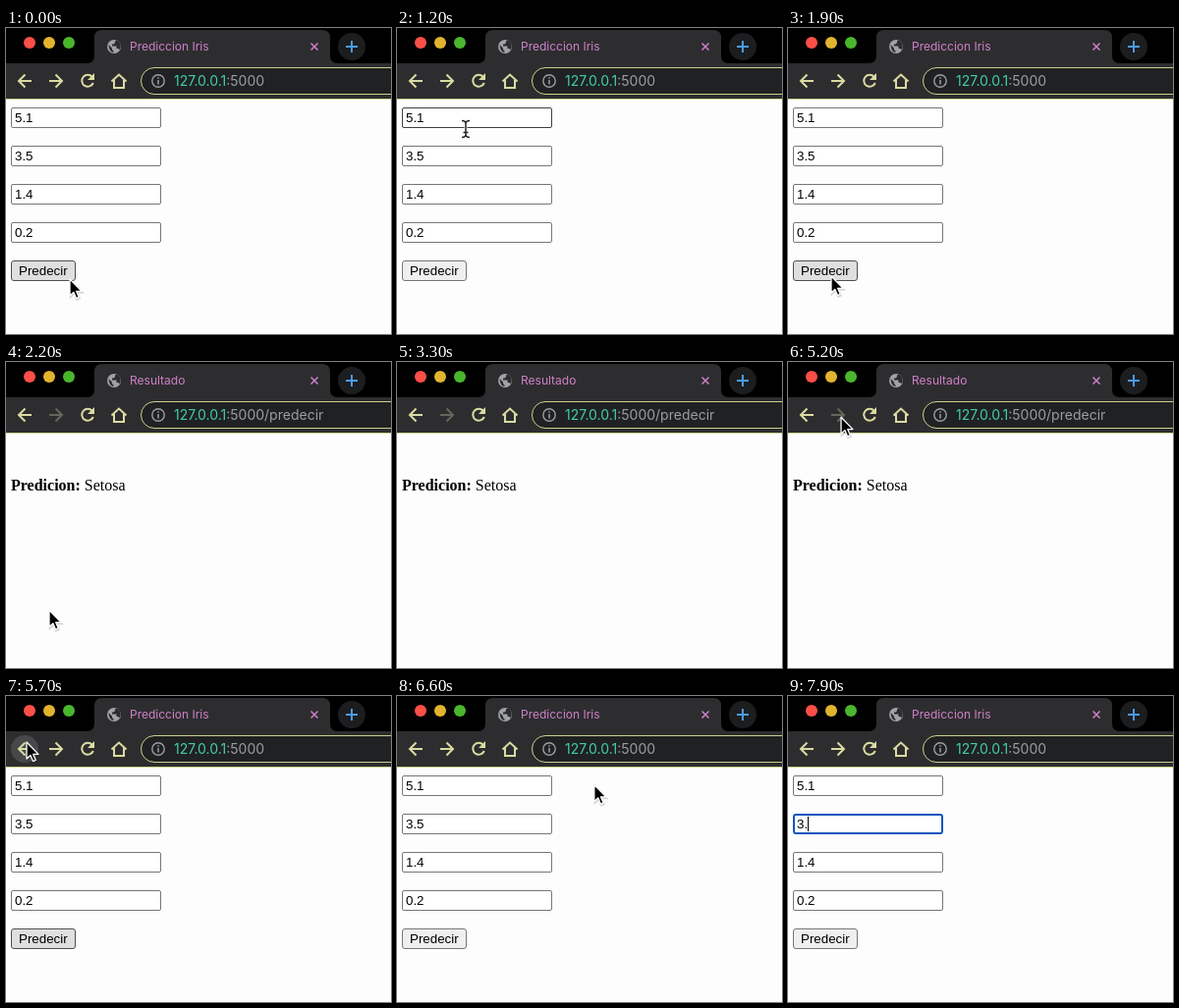
These frames come from a looping animation (392 px wide and 312 px high, 8 s). An HTML page:

```html
<!DOCTYPE html>
<html lang="es">
<head>
<meta charset="utf-8">
<title>Prediccion Iris</title>
<style>
  html, body { margin: 0; width: 100%; height: 100%; overflow: hidden; background: #fdfdfd; }
  svg { display: block; width: 392px; height: 312px; cursor: default; }
  text { white-space: pre; }
  .ui { font-family: Inter, Roboto, sans-serif; }
  .form { font: 13.333px "Liberation Sans", Arial, sans-serif; }
  .result { font: 16px "Liberation Serif", "Times New Roman", serif; }
  .icon { fill: none; stroke: #d9dba2; stroke-width: 2; }
</style>
</head>
<body>
<svg viewBox="0 0 392 312">
  <rect width="392" height="312" fill="#fdfdfd"/>

  <!-- tab strip -->
  <rect width="392" height="37" fill="#000"/>
  <circle cx="24" cy="15" r="6" fill="#fc4f48"/>
  <circle cx="44" cy="15" r="6" fill="#e2b42e"/>
  <circle cx="64" cy="15" r="6" fill="#4ab62d"/>
  <path d="M82 36Q90 36 90 28V10Q90 2 98 2H322Q330 2 330 10V28Q330 36 338 36Z" fill="#2d2d2f"/>
  <circle cx="110" cy="19" r="7" fill="#a0a3a6"/>
  <path d="M104.5 17l3.5 3.5v1.5l1.500 1.500v1.500q-4.800-1-5-8zM111 13.500v1.500l-1.500 1.500h-1.500v2h4.500v2.500h2l.8 1.500q2.200-2.500 1.200-6-1-3-4-4z" fill="#2d2d2f"/>
  <text id="tab" class="ui" x="126" y="23" font-size="12" fill="#cf80ca"></text>
  <path d="M310.500 15.500l7 7m0-7l-7 7" stroke="#cf80ca" stroke-width="1.500"/>
  <circle cx="352" cy="19" r="14" fill="#1c1d1f"/>
  <path d="M346 19h12M352 13v12" stroke="#4a9be8" stroke-width="2"/>

  <!-- toolbar -->
  <rect y="36" width="392" height="36" fill="#2d2d2f"/>
  <rect y="72" width="392" height="1" fill="#cdd08f"/>
  <circle id="backHover" cx="19" cy="54" r="14" fill="#47484a"/>
  <path class="icon" d="M26 54H13.500M19.500 47.500L13 54l6.500 6.500"/>
  <path id="forward" class="icon" d="M44 54h12.500M50.500 47.500L57 54l-6.500 6.500"/>
  <path class="icon" d="M87.800 49.800A6 6 0 1 0 88.800 56"/>
  <path d="M90 46v7h-7z" fill="#d9dba2"/>
  <path class="icon" d="M107.500 54.500L115 47.500l7.500 7M110 53v8h10v-8"/>
  <rect x="137.500" y="40.500" width="290" height="27" rx="13.500" fill="#202123" stroke="#cdd08f"/>
  <circle cx="155" cy="54" r="6.200" fill="none" stroke="#9b9ea1" stroke-width="1.400"/>
  <path d="M155 53v4.500M155 50.300v1.500" stroke="#9b9ea1" stroke-width="1.500"/>
  <text class="ui" x="171" y="59" font-size="14" fill="#9b9ea1"><tspan fill="#42cfa6">127.0.0.1</tspan>:5000<tspan id="path"></tspan></text>

  <g id="formPage" class="form">
    <g id="fields"></g>
    <rect id="button" x="5.500" y="237.500" width="65" height="20" rx="2.500"/>
    <text x="13" y="252">Predecir</text>
    <rect id="caret" y="123" width="1" height="15"/>
  </g>
  <text id="resultPage" class="result" x="5" y="131"><tspan font-weight="bold">Predicion:</tspan> Setosa</text>

  <g id="arrow">
    <path d="M0 0V17L3.900 13.400L6.500 19.600L9.300 18.400L6.700 12.400H12Z" transform="translate(.6 1.400)" fill="#000" stroke="#000" stroke-width="2" opacity=".15"/>
    <path d="M0 0V17L3.900 13.400L6.500 19.600L9.300 18.400L6.700 12.400H12Z" fill="#000" stroke="#fff" stroke-width="1.300" stroke-linejoin="round"/>
  </g>
  <g id="beam" fill="none">
    <path id="beamHalo" d="M-4 -8.500Q0 -8.500 0 -5.500Q0 -8.500 4 -8.500M0 -6V6M-4 8.500Q0 8.500 0 5.500Q0 8.500 4 8.500M-2.500 3.500H2.500" stroke="#fff" stroke-width="3"/>
    <path d="M-4 -8.500Q0 -8.500 0 -5.500Q0 -8.500 4 -8.500M0 -6V6M-4 8.500Q0 8.500 0 5.500Q0 8.500 4 8.500M-2.500 3.500H2.500" stroke="#222" stroke-width="1.500"/>
  </g>
</svg>
<script>
const LOOP = 8000;
const SUBMIT = 2000, BACK = 5600, ENTER_PAGE = 6000, FOCUS = 7300, ERASE = 7700;

// pointer stops: time, x, y
const stops = [
  [0, 65, 256], [50, 65, 256], [500, 74, 92], [850, 74, 92],
  [1200, 70, 103], [1500, 50, 266], [1700, 44, 253],
  [2850, 44, 253], [3250, 60, 318], [3750, 190, 318],
  [4600, 211, 100], [4650, 211, 100], [5400, 21, 47],
  [5850, 21, 47], [6300, 206, 85], [6450, 206, 85],
  [7200, 157, 137], [LOOP, 157, 137]
];
const values = ["5.1", "3.5", "1.4", "0.2"];
const $ = id => document.getElementById(id);

function make(tag, attrs, parent) {
  const el = document.createElementNS("http://www.w3.org/2000/svg", tag);
  set(el, attrs);
  return parent.appendChild(el);
}

function set(el, attrs) {
  for (const key in attrs) el.setAttribute(key, attrs[key]);
}

function show(el, on) {
  el.style.display = on ? "" : "none";
}

const fields = values.map((value, i) => {
  const y = 81 + 39 * i;
  const box = make("rect", { fill: "#fff" }, $("fields"));
  const label = make("text", { x: 9, y: y + 15 }, $("fields"));
  label.textContent = value;
  return { y, box, label };
});

function pointerAt(t) {
  const i = stops.findIndex(s => s[0] > t);
  const [t0, x0, y0] = stops[i - 1], [t1, x1, y1] = stops[i];
  const p = (t - t0) / (t1 - t0), e = p * p * (3 - 2 * p);
  return [x0 + (x1 - x0) * e, y0 + (y1 - y0) * e];
}

function draw(t) {
  const [x, y] = pointerAt(t);
  const result = t >= SUBMIT && t < BACK;
  const focused = t >= FOCUS, erased = t >= ERASE;
  const inside = (top, bottom) => !result && x >= 5 && x <= 159 && y >= top && y <= bottom;

  $("tab").textContent = result ? "Resultado" : "Prediccion Iris";
  $("path").textContent = result ? "/predecir" : "";
  $("forward").style.stroke = result ? "#66675a" : "";
  show($("formPage"), !result);
  show($("resultPage"), result);
  show($("backHover"), Math.hypot(x - 19, y - 54) < 14);

  let overField = false;
  fields.forEach((f, i) => {
    const over = inside(f.y - 2, f.y + 23);
    const ring = focused && i === 1;
    const inset = ring ? 1 : 0.5;
    overField = overField || over;
    set(f.box, {
      x: 5 + inset, y: f.y + inset, width: 153 - 2 * inset, height: 21 - 2 * inset,
      rx: ring ? 2 : 1.5, "stroke-width": 2 * inset,
      stroke: ring ? "#0f55bd" : over ? "#3f3f3f" : "#767676"
    });
  });
  fields[1].label.textContent = erased ? "3." : "3.5";
  show($("caret"), focused);
  set($("caret"), { x: erased ? 20 : 28 });

  // the button keeps its old hover state until the pointer re-enters the page
  const hot = (inside(237, 258) && x <= 71) || (t >= BACK && t < ENTER_PAGE);
  set($("button"), { fill: hot ? "#dfdfdf" : "#efefef", stroke: hot ? "#4f4f4f" : "#767676" });

  const place = `translate(${x.toFixed(2)} ${y.toFixed(2)})`;
  set($("arrow"), { transform: place });
  set($("beam"), { transform: place });
  show($("arrow"), !overField);
  show($("beam"), overField && !erased);
}

const start = performance.now();
function tick() {
  draw((performance.now() - start) % LOOP);
  requestAnimationFrame(tick);
}
tick();
</script>
</body>
</html>
```
